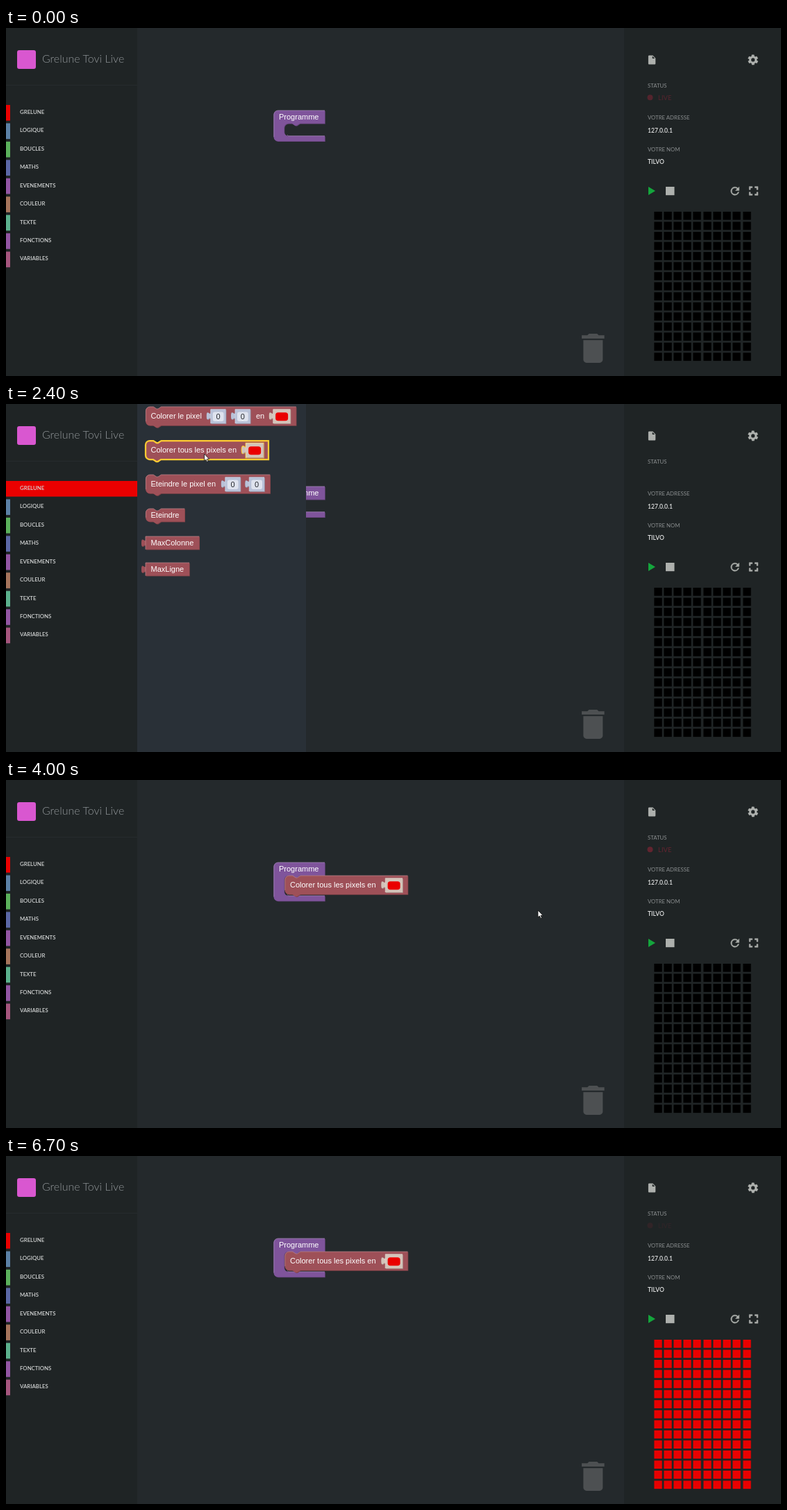
Animation of 1116 by 502 pixels, one loop 6800 ms. Source, as an HTML page:

```html
<!DOCTYPE html>
<html lang="fr">
<head>
<meta charset="utf-8">
<title>Programmation par blocs</title>
<style>
html, body { margin: 0; width: 100%; height: 100%; overflow: hidden; background: #24292c; }
svg { display: block; width: 100%; height: 100%; }
text { font-family: Lato, sans-serif; font-size: 7.8px; white-space: pre; }
.title { font-size: 16px; font-weight: 300; fill: #92979a; }
.menu { font-weight: 600; fill: #d4d6d6; }
.label { fill: #8b8f90; }
.value { font-size: 8.6px; font-weight: 600; fill: #e2e3e3; }
.live { font-size: 9.5px; }
.block text { font: 14.67px "Liberation Sans", Arial, sans-serif; fill: #fff; }
.block text.digit { fill: #25282d; text-anchor: middle; }
.shade { fill: color-mix(in srgb, var(--c) 80%, black); }
.face { fill: var(--c); }
.shine { fill: none; stroke: color-mix(in srgb, var(--c) 70%, white); stroke-width: 1; }
.selected > .face { stroke: #fc3; stroke-width: 3; }
.selected > .shine, .dragging > .shade { display: none; }
.dragging { opacity: .8; }
.icon { fill: #adb0ad; }
.bold { stroke: #adb0ad; stroke-width: .6; }
.cursor { fill: #fff; stroke: #111; stroke-width: .8; stroke-linejoin: round; }
.url { font: 11.5px "Noto Sans", sans-serif; fill: #5c5c5c; }
</style>
</head>
<body>
<svg id="stage" viewBox="0 0 1116 502" preserveAspectRatio="none"></svg>
<script>
const RED = '#ea0000', BRICK = '#9e5058', PURPLE = '#7f549b';
const LOOP = 6800, STEP = 100;

const rect = (x, y, w, h, fill, extra = '') =>
  `<rect x="${x}" y="${y}" width="${w}" height="${h}" fill="${fill}" ${extra}/>`;
const text = (x, y, cls, str) => `<text x="${x}" y="${y}" class="${cls}">${str}</text>`;
const icon = (x, y, scale, d, extra = 'class="icon"') =>
  `<path transform="translate(${x} ${y}) scale(${scale})" d="${d}" ${extra}/>`;

// Block geometry is in editor units, shown at 75 %.
const NOTCH = 'l6 4 3 0 6 -4', NOTCH_BACK = 'l-6 4 -3 0 -6 -4';
const TAB = 'v5c0 10 -8 -8 -8 7.5s8 -2.5 8 7.5';
const TOP_LEFT = 'V8A8 8 0 0 1 8 0';
const valuePath = (x, y, w, h) => `M${x} ${y}${TAB}V${y + h}h${w}v${-h}z`;
const stackPath = (w, h) =>
  `M0 8A8 8 0 0 1 8 0H15${NOTCH}H${w}v${h}H29.5${NOTCH_BACK}H8a8 8 0 0 1 -8 -8z`;
const programPath = inner =>
  `M0 8A8 8 0 0 1 8 0H98v25H50${NOTCH_BACK}h-7a8 8 0 0 0 -8 8v${inner - 16}` +
  `a8 8 0 0 0 8 8H98v10H8a8 8 0 0 1 -8 -8z`;

const shape = (d, shine) =>
  `<path class="shade" d="${d}" transform="translate(1 1)"/>` +
  `<path class="face" d="${d}"/><path class="shine" d="${shine}"/>`;
const place = (x, y) => `translate(${x} ${y}) scale(.75)`;
const block = (id, x, y, color, body) =>
  `<g id="${id}" class="block" style="--c:${color}" transform="${place(x, y)}">${body}</g>`;

function valueBlock(x, isColor) {
  const w = isColor ? 33 : 29, h = 27, color = isColor ? '#d3c3b9' : '#b9c2d8';
  const field = isColor
    ? rect(x + 4.5, 11, 24, 16, RED, 'rx="5"')
    : rect(x + 4, 10, 21, 18, '#dfe3ee', 'rx="4"') + text(x + 14.5, 24, 'digit', '0');
  return `<g style="--c:${color}">` +
    shape(valuePath(x, 5, w, h), `M${x} ${5 + h}V5H${x + w}`) + field + '</g>';
}

function stackBlock(id, x, y, w, h, label, inputs = [], more = '') {
  const holes = inputs.map(([ix, isColor]) => valuePath(ix, 5, isColor ? 33 : 29, 27)).join('');
  return block(id, x, y, BRICK,
    shape(stackPath(w, h) + holes, `M.5 ${h - 8}${TOP_LEFT}H15${NOTCH}H${w}`) +
    text(10, h > 30 ? 22.5 : 17.5, '', label) +
    inputs.map(input => valueBlock(...input)).join('') + more);
}

const outputBlock = (id, y, w, label) => block(id, 201, y, BRICK,
  shape(valuePath(0, 0, w, 25), `M0 25V0H${w}`) + text(10, 17.5, '', label));

const fillBlock = (id, x, y) =>
  stackBlock(id, x, y, 236, 36, 'Colorer tous les pixels en', [[193, true]]);

const flyout = `<g id="flyout">${rect(189, 0, 243, 502, '#293037')}` +
  stackBlock('pixel', 201, 4, 289, 36, 'Colorer le pixel',
    [[125, false], [172, false], [245, true]], text(212, 22.5, '', 'en')) +
  fillBlock('fill', 201, 53) +
  stackBlock('clear', 201, 102, 239, 36, 'Eteindre le pixel en', [[153, false], [199, false]]) +
  stackBlock('off', 201, 151, 75, 25, 'Eteindre') +
  outputBlock('columns', 191, 103, 'MaxColonne') +
  outputBlock('rows', 229, 84, 'MaxLigne') + '</g>';

const menu = [
  ['GRELUNE', RED], ['LOGIQUE', '#5b80a5'], ['BOUCLES', '#5bb05b'],
  ['MATHS', '#5b67a5'], ['EVENEMENTS', '#9255a3'], ['COULEUR', '#a5745b'],
  ['TEXTE', '#5bb08c'], ['FONCTIONS', '#9255a3'], ['VARIABLES', '#a5557d']
].map(([name, color], i) => {
  const y = 111 + i * 26.45;
  return rect(0, y, 6, 22.6, color, i ? '' : 'id="row"') + text(20, y + 12.8, 'menu', name);
}).join('');

const sidebar = rect(0, 0, 189, 502, '#1f2425') + rect(0, 82, 189, 1, '#262b2e') +
  rect(16, 32, 27, 27, '#d957d0', 'rx="3"') +
  text(52, 50, 'title', 'Grelune Tovi Live') + menu;

// Columns sit on whole-pixel steps.
const cells = Array.from({ length: 150 }, (_, i) => {
  const x = 933.4 + Math.floor(i % 10 * 14.24), y = 265 + Math.floor(i / 10) * 14.53;
  return `<rect x="${x}" y="${y}" width="11.3" height="11.7"/>`;
}).join('');

const panel = rect(890, 0, 226, 502, '#1f2425') +
  icon(922.3, 38.2, .65, 'M6 2c-1.1 0-2 .9-2 2v16c0 1.1.9 2 2 2h12c1.1 0 2-.9 2-2V8l-6-6zm7 7V3.5L18.5 9z') +
  icon(1066.8, 37, .74, 'M19.4 13a8 8 0 0 0 0-2l2.1-1.6a.5.5 0 0 0 .1-.7l-2-3.4a.5.5 0 0 0-.6-.2l-2.5 1a7 7 0 0 0-1.7-1l-.4-2.7a.5.5 0 0 0-.5-.4h-4a.5.5 0 0 0-.5.4l-.4 2.7a7 7 0 0 0-1.7 1l-2.5-1a.5.5 0 0 0-.6.2l-2 3.4a.5.5 0 0 0 .1.7L4.6 11a8 8 0 0 0 0 2l-2.1 1.6a.5.5 0 0 0-.1.7l2 3.4c.1.2.4.3.6.2l2.5-1a7 7 0 0 0 1.7 1l.4 2.7c0 .2.2.4.5.4h4c.3 0 .5-.2.5-.4l.4-2.7a7 7 0 0 0 1.7-1l2.5 1c.2.1.5 0 .6-.2l2-3.4a.5.5 0 0 0-.1-.7zM12 15.5a3.5 3.5 0 1 1 0-7 3.5 3.5 0 0 1 0 7z') +
  text(924, 85.8, 'label', 'STATUS') +
  `<g id="live" fill="#c3243e"><circle cx="927.5" cy="100.3" r="4"/>${text(939, 104, 'live', 'LIVE')}</g>` +
  text(924, 132, 'label', 'VOTRE ADRESSE') + text(924, 150.6, 'value', '127.0.0.1') +
  text(924, 178, 'label', 'VOTRE NOM') + text(924, 196.4, 'value', 'TILVO') +
  '<path d="M925 229l10 6-10 6z" fill="#14a53c"/>' + rect(950, 229, 12.5, 12.2, '#adb0ad') +
  icon(1040.7, 226.2, .75, 'M17.65 6.35A8 8 0 1 0 19.73 14h-2.08A6 6 0 1 1 12 6c1.66 0 3.14.69 4.22 1.78L13 11h7V4z', 'class="icon bold"') +
  icon(1065.7, 224.2, .9, 'M7 14H5v5h5v-2H7zM5 10h2V7h3V5H5zm12 7h-3v2h5v-5h-2zM14 5v2h3v3h2V5z', 'class="icon bold"') +
  `<g id="leds">${cells}</g>`;

const workspace =
  icon(817.4, 434, 2.33, 'M6 19c0 1.1.9 2 2 2h8c1.1 0 2-.9 2-2V7H6zM19 4h-3.5l-1-1h-5l-1 1H5v2h14z', 'fill="#4d5052"') +
  block('program', 385.5, 119, PURPLE, shape('', '') + text(10, 17.3, '', 'Programme'));

const statusBar = '<g id="status"><path d="M0 492H367q3.5 0 3.5 3.5V502H0z" fill="#e0dfdc"/>' +
  text(-1, 503.5, 'url', 'localhost:3000') + '</g>';

const $ = id => document.getElementById(id);
$('stage').innerHTML = rect(0, 0, 1116, 502, '#24292c') + workspace + sidebar + panel +
  flyout + fillBlock('moving', 0, 0) + statusBar + '<path id="cursor" class="cursor"/>';

const CURSORS = {
  arrow: 'M0 0v10l2.3-2 1.6 3.5 1.7-.7-1.6-3.4h3.2z',
  open: 'M-4.5-1c1-1 2 0 2.2 1v-4c0-1.2 1.6-1.2 1.6 0v-.8c0-1.2 1.7-1.2 1.7 0v.6c0-1.1 1.6-1.1 1.6 0v.9c.2-1 1.6-.9 1.6.2V2c0 2-1 3.5-2.5 3.5H-1C-2.5 5.5-3.5 2-4.5-1z',
  closed: 'M-4 0q0-1.5 1.6-1.2V-3q.8-1.4 1.7-.3 .9-1.3 1.8-.1 .9-1 1.6.2 1.4-.6 1.5.8V1.5C4.2 3.5 3 4.8 2 4.8H-1C-2.8 4.8-4 2-4 0z',
  pointer: 'M-2-4c0-1.4 1.7-1.4 1.7 0v3c.4-.9 1.5-.8 1.6 0 .4-.8 1.5-.6 1.5.2 .5-.6 1.4-.3 1.4.5V2c0 1.6-.8 3-1.8 3h-3C-1.8 5-3 2.7-4.3 1c-.4-1 .9-1.5 2.3 0z'
};

// [time, x, y]
const CURSOR_PATH = [
  [100, 300, 5], [400, 192, 85], [500, 192, 85], [800, 70, 121], [1100, 90, 122],
  [1300, 214, 205], [1600, 247, 132], [1800, 262, 110], [2200, 285.5, 72], [2400, 285.5, 72],
  [2800, 383, 118], [3100, 455, 139], [3300, 470, 148], [3700, 480, 150], [4000, 766, 188],
  [4200, 888, 226], [4400, 930, 239], [5300, 930, 239], [5600, 850, 300],
  [5900, 640, 335], [6300, 58, 30]
];
const DRAG_PATH = [[2400, 201, 53], [2800, 318.4, 111.8], [3100, 388, 132]];

function along(path, t) {
  const next = Math.max(1, path.findIndex(p => p[0] >= t));
  const [t0, x0, y0] = path[next - 1], [t1, x1, y1] = path[next];
  const k = (t - t0) / (t1 - t0);
  return [x0 + (x1 - x0) * k, y0 + (y1 - y0) * k];
}

const show = (id, on) => $(id).setAttribute('visibility', on ? 'visible' : 'hidden');
const within = (t, from, to) => t >= from && t < to;

function cursorKind(t) {
  if (within(t, 1400, 1800)) return 'open';
  if (within(t, 2500, 3200)) return 'closed';
  return within(t, 700, 1200) || within(t, 4300, 5400) ? 'pointer' : 'arrow';
}

function setProgram(inner) {
  const [shade, face, shine] = $('program').querySelectorAll('path');
  shade.setAttribute('d', programPath(inner));
  face.setAttribute('d', programPath(inner));
  shine.setAttribute('d', `M.5 ${27 + inner}${TOP_LEFT}H98M26 ${22.7 + inner}l2 2.3H98`);
}

function render(t) {
  const dropped = t >= 3200, dragging = within(t, 2500, 3200);
  $('live').setAttribute('opacity', (1 - Math.cos(2 * Math.PI * (t - 390) / 2030)) / 2);
  $('row').setAttribute('width', within(t, 700, 2500) ? 189 : 6);
  show('flyout', within(t, 1000, 2500));
  $('clear').classList.toggle('selected', within(t, 1500, 1900));
  $('fill').classList.toggle('selected', within(t, 2000, 2500));

  setProgram(dropped ? 39 : 24);
  show('moving', dragging || dropped);
  $('moving').classList.toggle('selected', within(t, 2500, 3800));
  $('moving').classList.toggle('dragging', dragging);
  $('moving').setAttribute('transform', place(...(dragging ? along(DRAG_PATH, Math.min(t, 3100)) : [401.5, 138])));

  $('leds').setAttribute('fill', t >= 4900 ? RED : '#000');
  show('status', within(t, 4600, 5500));

  const visible = within(t, 100, 6400);
  show('cursor', visible);
  if (visible) {
    $('cursor').setAttribute('d', CURSORS[cursorKind(t)]);
    $('cursor').setAttribute('transform', `translate(${along(CURSOR_PATH, Math.min(t, 6300))})`);
  }
}

const start = performance.now();
function tick(now) {
  const t = Math.max(0, now - start) % LOOP;
  render(Math.floor(t / STEP) * STEP);
  requestAnimationFrame(tick);
}
render(0);
requestAnimationFrame(tick);
</script>
</body>
</html>
```
